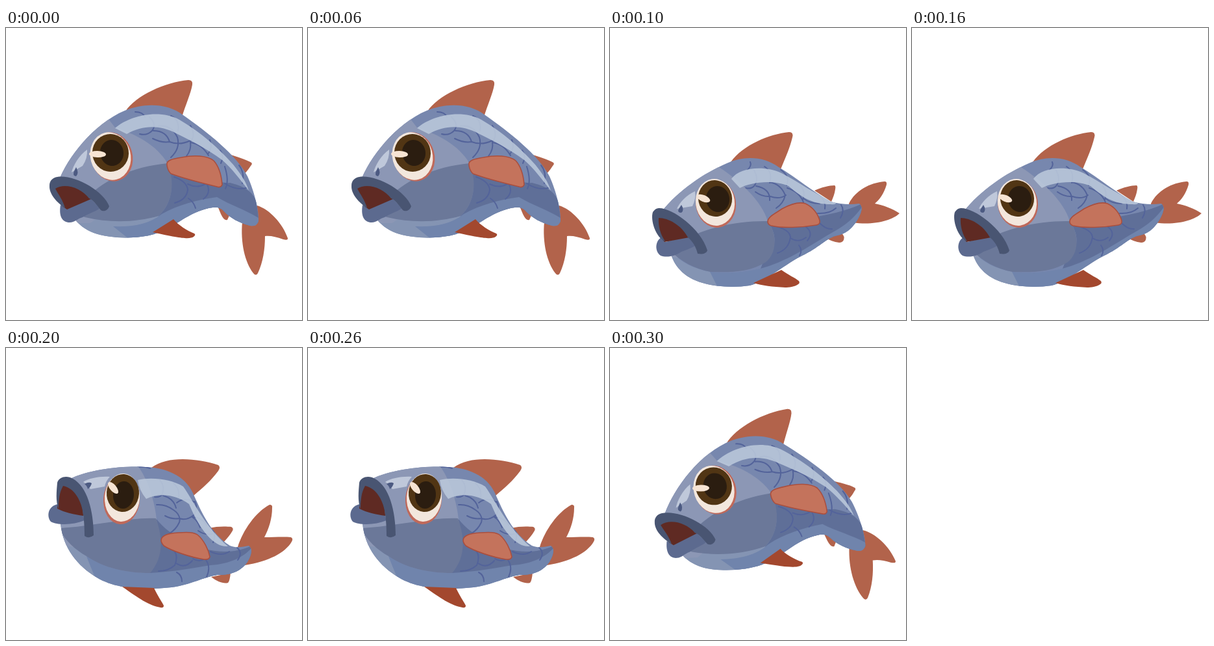
These frames come from a looping animation (456 by 449 pixels, 400 ms). An HTML page with a canvas:

```html
<!DOCTYPE html>
<html lang="en">
<head>
<meta charset="utf-8">
<title>Flopping fish</title>
<style>
html, body { margin: 0; width: 100%; height: 100%; overflow: hidden; background: #fff; }
canvas { display: block; }
</style>
</head>
<body>
<canvas id="stage" width="456" height="449"></canvas>
<script>
const ctx = document.getElementById('stage').getContext('2d');
const STEP = 100;

const C = {
  fin: '#b2634b', pelvic: '#a3482e', paddle: '#c4735c', paddleEdge: '#a94f3f',
  back: '#7787ae', low: '#5f6f98', belly: '#7084ac', head: '#8c97b5',
  cheek: '#6b7899', chin: '#8494b3', shine: '#bccadc', face: '#bfc8da', scale: '#53639a',
  lip: '#495572', jaw: '#5c6a8f', mouth: '#5f2a23', nostril: '#4c5a82',
  rim: '#c0695a', white: '#f3e7dd', iris: '#513514', pupil: '#2b1d10', glint: '#f7e4d3'
};

// Eye entries are [x, y, rx, ry, angle in degrees].
const arched = {
  dorsal: 'M184 128C200 104 245 83 281 80Q288 80 287 87C285 100 276 120 271 137L230 130Z',
  tail: 'M387 273C406 279 426 300 434 323Q435 327 427 325C416 321 407 319 399 320C399 340 396 360 388 377Q385 382 381 377C368 360 361 330 364 298Z',
  upperFin: 'M340 193C355 198 370 202 378 207Q380 209 377 212C372 220 367 225 362 228Z',
  lowerFin: 'M326 274L331 286Q336 297 341 295L347 282Z',
  pelvic: 'M226 314L258 294C265 303 280 312 290 316Q293 318 289 321C283 325 270 324 226 314Z',
  body: 'M81 236C94 200 135 147 183 127C210 116 247 114 273 134C310 160 355 195 372 228C382 250 390 280 389 297Q386 306 376 304C360 300 345 292 335 281C328 274 320 275 305 279C275 288 262 305 228 317C200 325 160 324 135 315C122 310 112 302 106 294Z',
  low: 'M247 205C290 225 330 240 345 238C365 243 380 250 386 268L390 300L230 330L235 289C258 268 260 235 247 207Z',
  belly: 'M165 305C195 306 220 302 240 286C265 272 295 264 325 260C345 272 370 280 389 292L389 310L320 290L240 330L190 325Z',
  head: 'M150 130L168 153C200 163 232 180 249 208L130 300L60 300L60 140Z',
  cheek: 'M118 268C145 235 195 213 249 208C260 235 258 268 235 289C200 299 160 300 122 291L90 280Z',
  chin: 'M90 285L122 291C150 297 200 297 235 289L228 325L100 325Z',
  shine: 'M168 154C190 135 235 124 267 141C300 160 330 187 350 210C362 225 370 237 374 250C360 232 348 216 333 203C310 186 285 173 262 162C235 148 210 150 186 163Z',
  scales: 'M199 129Q211 129 214 137M221 137Q233 148 225 158Q217 166 206 163M227 158Q247 158 252 175M235 151Q254 148 264 168Q269 185 254 199M226 170Q240 177 252 175Q268 181 284 173M254 135Q268 141 265 158M284 150Q293 165 284 175Q286 187 278 197M284 176Q301 178 312 196M314 172Q319 184 311 194M330 188Q337 197 331 208M259 229Q279 236 280 249Q278 264 260 269M280 240Q294 247 307 240M281 262Q289 267 292 277M310 241Q316 254 304 263M337 213Q344 235 338 247M337 239Q354 250 370 246M359 211Q368 222 364 239',
  face: 'M125 187C113 195 103 212 101 222L118 212Q126 200 125 187Z',
  nostril: 'M108 214Q113 223 108 228Q102 227 105 220Z',
  lip: 'M79 229C105 225 150 250 159 274C157 281 150 283 146 280C138 270 134 264 128 262C115 245 90 238 76 247C80 255 88 265 91 277C78 268 66 255 67 242C67 235 72 230 79 229Z',
  mouth: 'M74 245C90 235 119 242 131 263L94 279L88 275C80 267 73 258 74 245Z',
  jaw: 'M84 272C81 290 87 299 98 299C106 299 110 293 118 291C130 284 143 280 144 277L130 262L94 278Z',
  paddle: 'M248 211C246 203 258 201 270 199C290 195 310 196 320 204C328 213 332 228 333 241Q331 246 325 244C300 238 270 230 254 224Q249 219 248 211Z',
  eye: {
    rim: [163, 198, 32, 38, -15], white: [161, 197, 31, 37, -15],
    iris: [161, 192, 28, 29, -10], pupil: [163, 192, 18, 20, -10], glint: [141, 194, 13, 5, 2]
  }
};

const flat = {
  dorsal: 'M186 206C205 180 245 163 276 160Q283 160 281 168C277 185 270 200 263 217L225 210Z',
  tail: 'M368 270C378 250 400 238 423 236Q427 236 426 241C422 255 415 264 408 270C420 272 436 278 446 285C435 296 405 304 374 299Z',
  upperFin: 'M315 250C325 245 338 242 346 242Q348 243 347 248C346 255 344 260 341 267Z',
  lowerFin: 'M330 322L357 316Q362 320 360 326Q358 330 353 330C345 329 338 326 330 322Z',
  pelvic: 'M221 392L264 372C275 380 285 384 291 389Q293 392 290 394C285 398 275 399 270 399C250 398 235 396 221 392Z',
  body: 'M80 282C105 250 145 223 180 208C205 197 235 196 260 214C290 232 310 250 340 267C355 271 370 272 384 270Q390 274 386 285C380 300 368 316 350 319C335 322 325 335 300 348C270 362 240 390 215 396C180 401 130 397 108 372C100 364 96 355 93 345Z',
  low: 'M243 297C280 295 340 292 389 270L389 330L220 400L240 350C260 335 255 315 243 297Z',
  belly: 'M154 375C180 378 215 376 245 366C285 352 315 330 345 313C365 302 378 290 389 274L389 325L300 355L220 405L165 397Z',
  head: 'M145 205L168 214C200 235 233 265 243 297L200 360L60 350L60 210Z',
  cheek: 'M100 335C140 307 195 296 243 297C258 318 257 346 240 360C215 376 185 376 155 375C130 370 110 360 90 340Z',
  chin: 'M88 338C110 362 130 370 155 375L165 393L170 405L90 405Z',
  shine: 'M187 232C200 214 238 211 264 223C290 236 315 256 348 268Q349 272 340 271C315 271 298 263 275 243C250 232 215 238 200 246Z',
  scales: 'M216 206Q219 212 211 219M222 219Q230 233 222 243Q217 248 209 246M225 243Q247 247 246 265M238 213Q251 221 246 238M246 237Q263 240 270 257Q267 270 256 277M224 252Q235 260 247 259Q261 264 271 257M263 218Q278 228 272 242M273 246Q292 252 298 268M294 243Q302 252 297 264M298 262Q308 270 323 270M324 259Q333 267 331 278M251 304Q276 309 278 321Q276 340 258 346M278 323Q290 331 302 322M291 334Q297 342 292 350M302 306Q314 315 304 327M320 285Q338 286 348 277M323 300Q333 310 342 309M356 272Q362 280 355 292',
  face: 'M131 251C118 257 107 268 103 278L127 274Q133 262 131 251Z',
  nostril: 'M110 272Q115 280 110 284Q103 284 106 278Z',
  lip: 'M75 277C95 276 140 308 150 342C148 348 140 348 135 347C132 335 127 328 120 322C110 303 90 292 75 292C74 305 78 318 85 328C70 322 62 295 66 283Q70 277 75 277Z',
  mouth: 'M74 290C92 286 115 303 122 322L84 329C74 319 70 305 74 290Z',
  jaw: 'M79 322C69 328 69 344 78 350C88 354 102 350 110 344C122 340 130 336 132 334L120 321L85 329Z',
  paddle: 'M243 298C243 290 255 285 265 278C280 270 292 267 301 270C312 275 320 285 323 296Q324 302 318 303C295 307 265 308 248 304Q243 302 243 298Z',
  eye: {
    rim: [163, 270, 31, 37, -8], white: [162, 268, 30, 36, -8],
    iris: [162, 262, 26, 28, -12], pupil: [166, 263, 18, 20, -10], glint: [144, 262, 11, 5, 22]
  }
};

const raised = {
  dorsal: 'M224 184C250 165 295 170 327 180Q331 183 327 189C315 205 303 215 289 227L250 195Z',
  tail: 'M357 306C365 280 385 252 406 241Q411 241 410 246C410 262 405 278 398 291C412 291 428 290 439 291Q443 293 440 298C430 315 405 328 368 334Z',
  upperFin: 'M312 277C325 274 338 274 347 275Q351 277 349 281C345 288 340 293 335 299Z',
  lowerFin: 'M316 352L346 346C345 354 344 359 342 361C335 363 325 359 316 352Z',
  pelvic: 'M179 367L228 369C233 380 240 390 243 396Q243 400 238 399C220 396 205 385 179 367Z',
  body: 'M97 202C130 186 180 181 215 183C245 184 275 195 288 223C300 250 315 285 345 304C355 308 365 306 374 304Q380 308 377 318C370 340 350 350 325 349C305 352 285 364 255 368C225 371 175 374 140 353C110 335 88 308 84 270Z',
  low: 'M231 262C260 300 330 328 378 304L378 350L220 360L222 342C240 325 240 290 231 262Z',
  belly: 'M124 320C150 338 185 346 222 346C260 344 290 338 315 334C345 332 365 322 378 308L378 360L220 385L140 360Z',
  head: 'M90 175L202 180C218 200 229 235 232 264L180 320L70 300Z',
  cheek: 'M82 277C130 275 190 260 231 262C244 298 240 325 222 346C185 346 150 338 124 320C104 308 90 295 82 277Z',
  chin: 'M78 268C92 297 106 310 124 320L130 335L142 360L80 330Z',
  shine: 'M203 203C225 198 255 202 273 213C289 235 305 273 342 305C322 307 300 283 282 240C262 225 235 222 216 232Q205 219 203 203Z',
  scales: 'M203 183Q213 182 222 185M237 203Q246 214 240 226Q236 230 229 229M242 227Q258 231 262 246M258 208Q268 216 266 230M263 238Q276 228 290 237M232 241Q246 240 258 249Q270 257 267 268Q262 279 252 285M245 258Q256 264 267 262Q278 266 289 257M291 236Q297 249 287 260Q295 265 299 276M289 260Q302 261 309 272M296 281Q306 288 318 286M318 277Q324 289 319 299M258 311Q266 319 260 334Q250 343 235 343M262 331Q276 340 287 327M288 324Q297 330 307 324M263 345Q271 349 271 359M308 326Q316 337 309 352M315 313Q332 321 344 313M356 307Q365 315 357 326',
  face: 'M160 198C145 197 128 200 119 206Q127 211 130 217L152 213Q154 204 160 198Z',
  nostril: 'M121 209Q128 205 132 208Q131 213 126 217Q125 212 121 209Z',
  lip: 'M79 207C82 197 95 196 103 201C125 213 135 250 135 288Q128 294 121 289C121 275 120 262 119 257C117 235 105 215 88 212C82 222 81 235 81 248C76 235 78 220 79 207Z',
  mouth: 'M87 210C106 211 119 235 119 258C105 256 90 253 79 247C79 230 81 217 87 210Z',
  jaw: 'M80 240C65 243 62 258 69 267C80 273 105 272 121 265L118 256C105 255 90 252 80 246Z',
  paddle: 'M239 297C238 288 250 285 265 284C280 283 290 283 296 288C305 296 312 310 314 321Q313 326 305 325C285 322 255 312 243 304Q240 301 239 297Z',
  eye: {
    rim: [178, 233, 28, 38, 4], white: [179, 230, 27, 37, 4],
    iris: [180, 223, 25, 29, 4], pupil: [181, 226, 16, 21, 4], glint: [165, 215, 11, 5, 50]
  }
};

// The last pose is the arched one tipped back and lowered.
const tilt = -3.3 * Math.PI / 180, cos = Math.cos(tilt), sin = Math.sin(tilt);
const frames = [
  { pose: arched },
  { pose: flat },
  { pose: raised },
  { pose: arched, move: [cos, sin, -sin, cos, -12, 30] }
];

function fill(pose, part, color = C[part]) {
  ctx.fillStyle = color;
  ctx.fill(new Path2D(pose[part]));
}

function stroke(pose, part, color, width) {
  ctx.strokeStyle = color;
  ctx.lineWidth = width;
  ctx.stroke(new Path2D(pose[part]));
}

function drawEye(eye) {
  for (const [part, [x, y, rx, ry, deg]] of Object.entries(eye)) {
    ctx.fillStyle = C[part];
    ctx.beginPath();
    ctx.ellipse(x, y, rx, ry, deg * Math.PI / 180, 0, Math.PI * 2);
    ctx.fill();
  }
}

function drawBody(pose) {
  ctx.save();
  ctx.clip(new Path2D(pose.body));
  for (const part of ['low', 'chin', 'belly']) fill(pose, part);
  stroke(pose, 'scales', C.scale, 2);
  for (const part of ['head', 'cheek']) fill(pose, part);
  ctx.globalAlpha = 0.87;
  fill(pose, 'shine');
  ctx.restore();
}

function drawFish(pose) {
  for (const part of ['dorsal', 'tail', 'upperFin', 'lowerFin']) fill(pose, part, C.fin);
  fill(pose, 'body', C.back);
  drawBody(pose);
  fill(pose, 'pelvic');
  fill(pose, 'face');
  fill(pose, 'nostril');
  drawEye(pose.eye);
  for (const part of ['jaw', 'mouth', 'lip', 'paddle']) fill(pose, part);
  stroke(pose, 'paddle', C.paddleEdge, 1.6);
}

function render(time) {
  const { pose, move } = frames[Math.floor(time / STEP) % frames.length];
  ctx.setTransform(1, 0, 0, 1, 0, 0);
  ctx.fillStyle = '#fff';
  ctx.fillRect(0, 0, 456, 449);
  ctx.lineCap = ctx.lineJoin = 'round';
  if (move) ctx.setTransform(...move);
  drawFish(pose);
}

function tick() {
  render(performance.now());
  requestAnimationFrame(tick);
}
tick();
</script>
</body>
</html>
```
